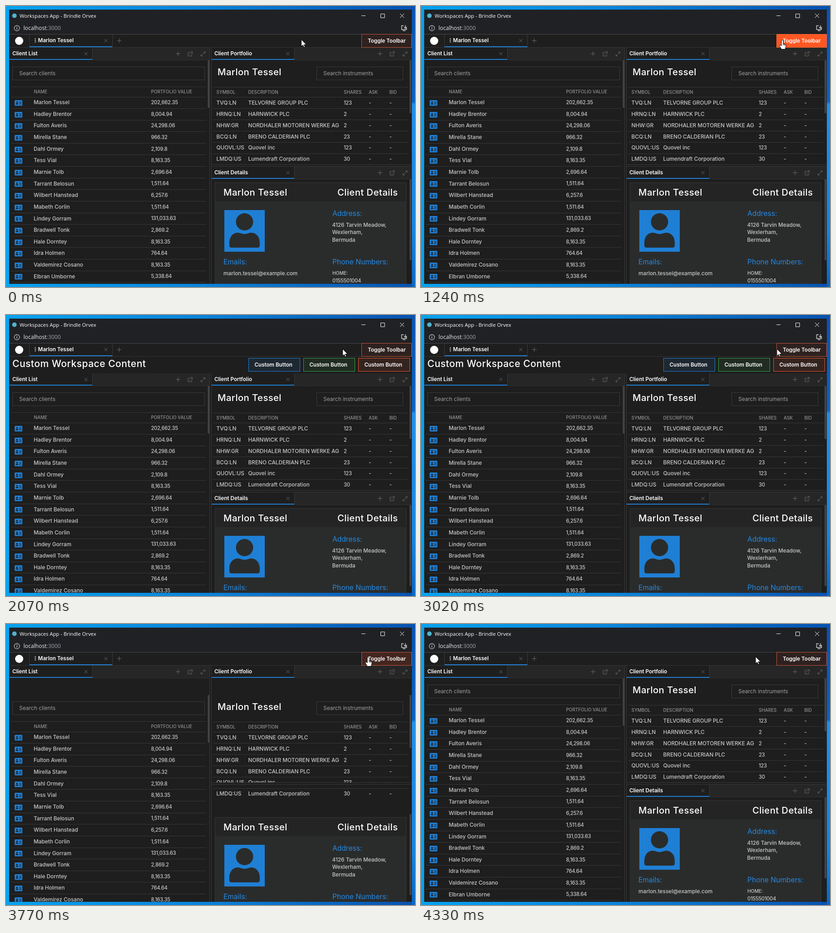
An HTML page for the animation above (5.46 s loop, 901 px wide and 621 px high).

```html
<!DOCTYPE html>
<html lang="en">
<head>
<meta charset="utf-8">
<title>Workspaces App</title>
<style>
html, body { margin: 0; width: 100%; height: 100%; overflow: hidden; background: #0a78d0; }
svg { display: block; width: 901px; height: 621px; }
text { font-family: Inter, "Open Sans", sans-serif; font-weight: 500; fill: #c9c9c9; white-space: pre; }
.chrome { font: 400 11.3px "Open Sans", sans-serif; fill: #fff; }
.url { font: 400 12.2px "Open Sans", sans-serif; fill: #f0f0f0; }
.tab { font-size: 11.6px; font-weight: 600; fill: #fff; }
.title { font-size: 20.3px; letter-spacing: .02em; fill: #fff; }
.head { font-size: 9.9px; fill: #929292; }
.row { font-size: 11.8px; }
.num { font-size: 11.2px; letter-spacing: -.025em; }
.hint { font-size: 12px; fill: #a0a0a0; font-weight: 400; }
.label { font-size: 15.6px; fill: #2489e3; font-weight: 400; }
.small { font-size: 10.2px; }
</style>
</head>
<body>
<svg id="stage" viewBox="0 0 901 621" xmlns="http://www.w3.org/2000/svg"></svg>
<script>
const LOOP = 5460, TOOLBAR = 37;
const BG = '#1e1e1e', BAR = '#262626', EDGE = '#3a3a3a', BLUE = '#1f7fd4', ICON = '#686868';

const clients = [
  ['Marlon Tessel', '202,662.35'], ['Hadley Brentor', '8,004.94'], ['Fulton Averis', '24,298.06'],
  ['Mirella Stane', '966.32'], ['Dahl Ormey', '2,109.8'], ['Tess Vial', '8,163.35'],
  ['Marnie Tolb', '2,696.64'], ['Tarrant Belosun', '1,511.64'], ['Wilbert Hanstead', '6,257.6'],
  ['Mabeth Corlin', '1,511.64'], ['Lindey Gorram', '131,033.63'], ['Bradwell Tonk', '2,869.2'],
  ['Hale Dorntey', '8,163.35'], ['Idra Holmen', '764.64'], ['Valdemirez Cosano', '8,163.35'],
  ['Elbran Umborne', '5,338.64']
];
const holdings = [
  ['TVQ:LN', 'TELVORNE GROUP PLC', 123], ['HRNQ:LN', 'HARNWICK PLC', 2],
  ['NHW:GR', 'NORDHALER MOTOREN WERKE AG', 2], ['BCQ:LN', 'BRENO CALDERIAN PLC', 23],
  ['QUOVL:US', 'Quovel inc', 123], ['LMDQ:US', 'Lumendraft Corporation', 30]
];
const owner = clients[0][0];

const text = (x, y, s, cls) => `<text x="${x}" y="${y}" class="${cls}">${s}</text>`;
const rect = (x, y, w, h, fill, extra = '') =>
  `<rect x="${x}" y="${y}" width="${w}" height="${h}" fill="${fill}" ${extra}/>`;
const path = (d, stroke = EDGE, extra = '') => `<path d="${d}" fill="none" stroke="${stroke}" ${extra}/>`;
const hline = (x1, x2, y, c = '#373737') => path(`M${x1} ${Math.floor(y) + .5}H${x2}`, c);
const cross = (x, y, r = 3.5) => path(`M${x - r} ${y - r}l${2 * r} ${2 * r}m0 ${-2 * r}l${-2 * r} ${2 * r}`, ICON);
const plus = (x, y) => path(`M${x - 5} ${y}h10m-5 -5v10`, ICON);
const clip = (id, x, y, w, h) => `<clipPath id="${id}">${rect(x, y, w, h, '#fff')}</clipPath>`;

function tabStrip(x, y, name) {
  const right = x + 371, mid = y + 13.5;
  return rect(x, y, 440, 27, BAR) + rect(x, y, 182, 27, BG) + path(`M${x + 182.5} ${y}v27`) +
    hline(x + 183, x + 440, y + 27, '#303030') + rect(x, y + 25, 182, 2, BLUE) +
    text(x + 6, y + 17, name, 'tab') + cross(x + 168, mid) + plus(right, mid) +
    path(`M${right + 26} ${mid - 3}h-4v8h8v-4m-5 1l6 -6m-4 -.5h4.5v4.5`, ICON) +
    path(`M${right + 51} ${mid + 4.5}l8 -8m-3 -.5h3.5v3.5m-9 2v3.5h3.5`, ICON);
}

const search = (x, w, s) => rect(x, 134.5, w, 29, BG, `stroke="${EDGE}"`) + text(x + 14.5, 152.8, s, 'hint');
const scrollbar = (x, y, h) => rect(x, y, 4, h, '#444', 'rx="1"');

function clientView() {
  const rows = clients.map(([name, value], i) => {
    const y = 213 + i * 25.63, top = Math.round(y - 5);
    return rect(19, top, 17, 12.5, BLUE, 'rx="1.5"') +
      `<circle cx="24.3" cy="${top + 4.5}" r="1.8" fill="${BG}"/>` +
      rect(21.5, top + 7, 5.6, 2.5, BG, 'rx="1"') +
      path(`M29 ${top + 4}h5m-5 2.5h5m-5 2.5h5`, BG) +
      text(61, y + 4.2, name, 'row') + text(319.5, y + 4, value, 'num') + hline(11, 441, y + 13.4);
  }).join('');
  return rect(8, 120, 440, 494, BG) + search(14.5, 423, 'Search clients') + hline(11, 441, 178) +
    text(61.5, 193.2, 'NAME', 'head') + text(319.5, 193.2, 'PORTFOLIO VALUE', 'head') +
    hline(11, 441, 201) + rows + scrollbar(444.5, 120, 105);
}

function portfolioView() {
  const heads = [['SYMBOL', 463.5], ['DESCRIPTION', 533.5], ['SHARES', 744], ['ASK', 799], ['BID', 844.5]];
  const rows = holdings.map(([symbol, name, shares], i) => {
    const y = 218 + i * 24.85;
    return text(463.5, y, symbol, 'row') + text(533.5, y, name, 'row') + text(744, y, shares, 'num') +
      text(799, y, '-', 'row') + text(844.5, y, '-', 'row') + hline(456, 886, y + 8.6);
  }).join('');
  return rect(453, 120, 440, 230, BG) + text(466, 153, owner, 'title') +
    search(684.5, 190, 'Search instruments') + hline(456, 886, 179) +
    heads.map(([s, x]) => text(x, 194, s, 'head')).join('') + hline(456, 886, 201) + rows +
    scrollbar(889, 120, 117);
}

function detailsView() {
  return rect(453, 383, 440, 231, BG) + rect(460.5, 390.5, 421, 240, '#2a2c2c', 'stroke="#363636"') +
    rect(461, 391, 420, 41, '#242424') + text(479, 419, owner, 'title') + text(730, 419, 'Client Details', 'title') +
    rect(481, 451, 89, 92, BLUE) + `<circle cx="525.5" cy="477" r="19" fill="#2a2c2c"/>` +
    `<path d="M492 529V523C492 510 500 501 511 501C516 501 519 504 525.5 504S535 501 540 501C551 501 559 510 559 523V529Q559 534 554 534H497Q492 534 492 529Z" fill="#2a2c2c"/>` +
    text(719, 464, 'Address:', 'label') + text(718.5, 487.5, '4126 Tarvin Meadow,', 'row') +
    text(718.5, 504, 'Wexlerham,', 'row') + text(718.5, 521, 'Bermuda', 'row') +
    text(479, 571, 'Emails:', 'label') + text(479, 594.5, 'marlon.tessel@example.com', 'row') +
    text(719, 571, 'Phone Numbers:', 'label') + text(719, 594, 'HOME:', 'small') +
    text(719, 611, '0155501004', 'num') + scrollbar(889, 383, 179);
}

function customButton(x, color) {
  return rect(x, 95.5, 113, 29, color, `fill-opacity=".1" stroke="${color}"`) +
    text(x + 13, 114.2, 'Custom Button', 'tab');
}

const chrome = rect(7, 8, 887, 606, BG) + rect(7, 8, 887, 54, '#202124') +
  '<circle cx="18.5" cy="21.5" r="5" fill="#4fb4d0"/>' +
  text(30, 25.8, 'Workspaces App - Brindle Orvex', 'chrome') +
  path('M783 21.5h9M825.5 17.5h8.5v8.5h-8.5zM868 17l9 9m0 -9l-9 9', '#fff') +
  '<circle cx="24" cy="49" r="5.8" fill="none" stroke="#c8c8c8" stroke-width="1.2"/>' +
  path('M24 48v4.2M24 45.5v1.4', '#c8c8c8', 'stroke-width="1.4"') +
  text(38.5, 53.2, 'localhost<tspan fill="#9aa0a6">:3000</tspan>', 'url') +
  path('M876 43.5h-4.5v8.5h11v-3.5M874 54.5h6M880 42.5v7m-3 -3l3 3l3 -3', '#d0d0d0', 'stroke-width="1.4"') +
  hline(7, 894, 62, '#484848') + hline(8, 893, 91, '#343434') +
  '<circle cx="29" cy="77" r="9" fill="#fff"/>' +
  path('M51.5 63v28M234.5 63v28') + rect(52, 89, 182, 2, BLUE) +
  path('M64.5 71.5v9', '#ddd', 'stroke-width="2" stroke-dasharray="2 1.5"') +
  text(70.5, 80.2, owner, 'tab') + cross(220, 76.5) + plus(249.5, 76.5);

const stage = document.getElementById('stage');
stage.innerHTML = `<defs>
  <linearGradient id="sky"><stop stop-color="#08a2ee"/><stop offset=".45" stop-color="#0a86dc"/><stop offset="1" stop-color="#0852b0"/></linearGradient>
  <linearGradient id="side" x2="0" y2="1"><stop stop-color="#0852b0"/><stop offset=".34" stop-color="#0b63c2"/><stop offset=".35" stop-color="#2090ea"/><stop offset=".8" stop-color="#1685e0"/><stop offset="1" stop-color="#0a66c0"/></linearGradient>
  ${clip('window', 7, 8, 887, 606)}${clip('upper', 453, 120, 440, 230)}</defs>
  ${rect(0, 0, 901, 621, 'url(#sky)')}${rect(894, 0, 7, 621, 'url(#side)')}
  <g clip-path="url(#window)">${chrome}
    <g id="custom">${text(14, 115, 'Custom Workspace Content', 'title" style="font-size:21px;letter-spacing:.024em')}
      ${customButton(534.5, '#1f80d8')}${customButton(655.5, '#35a548')}${customButton(776.5, '#f0562c')}</g>
    <g id="tabs">${tabStrip(8, 92, 'Client List')}${tabStrip(453, 92, 'Client Portfolio')}${tabStrip(453, 355, 'Client Details')}</g>
    <g id="views">${clientView()}<g clip-path="url(#upper)">${portfolioView()}</g>${detailsView()}</g>
    <g id="splitters">${rect(448, 92, 5, 530, BG)}${path('M448.5 92V622M452.5 92V622')}
      ${rect(453, 350, 440, 5, BG)}${path('M453 350.5H893M453 354.5H893')}</g>
    <rect id="toggle" x="783.5" y="62.5" width="110" height="29"/>${text(797, 81, 'Toggle Toolbar', 'tab')}
  </g>
  <g id="pointer" fill="#fff" stroke="#000" stroke-linejoin="round">
    <path id="arrow" d="M0 0V15.5L3.6 12.2L6 17.5L8.3 16.5L6 11.3H11Z"/>
    <g id="hand"><path d="M-2 1.5C-2 -1.5 2 -1.5 2 1.5V7.5L6 8.5C8 9 8.4 10 8.2 12L7.4 16L6 19.5H-2L-6 12.5C-6.8 10.5 -5 9.5 -3.8 10.5L-2 12Z"/>
      <path d="M2 7v4M4.2 8.5v3M6.2 9v3" fill="none" stroke-width=".8"/></g>
  </g>`;

const part = id => document.getElementById(id);
const [custom, tabs, views, splitters, toggle, pointer, arrow, hand] =
  ['custom', 'tabs', 'views', 'splitters', 'toggle', 'pointer', 'arrow', 'hand'].map(part);

// Keys: time, then values
const cursorKeys = [
  [0, 650.5, 74], [200, 650.5, 74], [760, 787, 78], [970, 796, 76], [1380, 796, 76], [1590, 781.5, 76],
  [1870, 748, 75], [2010, 741.5, 75], [2600, 741.5, 75], [3020, 784, 75], [3160, 789, 73],
  [3500, 789, 73], [3570, 798, 74], [3840, 798, 74], [4190, 741, 72], [4330, 737, 72], [LOOP, 737, 72]
];
const hoverKeys = [
  [0, 0], [800, 0], [1100, 1], [1309, 1], [1310, .1], [1520, 1], [1590, 1], [1870, 0],
  [3020, 0], [3370, 1], [3769, 1], [3770, .1], [3950, .8], [4190, 0], [LOOP, 0]
];

function sample(keys, t) {
  const i = keys.findIndex(k => k[0] > t), a = keys[i - 1], b = keys[i];
  const p = (t - a[0]) / (b[0] - a[0]);
  return a.slice(1).map((v, j) => v + (b[j + 1] - v) * p);
}

function tick(t) {
  const start = [0, 270, 1310, 2670, 3570, 3770].filter(s => s <= t).pop();
  return start + Math.floor((t - start) / 70) * 70;
}

const mix = (a, b, p) => `rgb(${a.map((v, i) => Math.round(v + (b[i] - v) * p))})`;
const shift = (el, y) => el.setAttribute('transform', `translate(0 ${y})`);

function draw(t) {
  const open = t >= 1310 && t < 3770, viewsOpen = t >= 1310 && t < 3840;
  custom.style.display = open ? '' : 'none';
  shift(tabs, open ? TOOLBAR : 0);
  shift(splitters, open ? TOOLBAR : 0);
  shift(views, viewsOpen ? TOOLBAR : 0);

  const time = tick(t), [hover] = sample(hoverKeys, time), [x, y] = sample(cursorKeys, time);
  toggle.setAttribute('fill', mix([46, 33, 31], [255, 87, 34], hover));
  toggle.setAttribute('stroke', mix([196, 86, 62], [255, 105, 60], hover));
  pointer.setAttribute('transform', `translate(${x} ${y})`);
  const pointing = x > 788;
  arrow.style.display = pointing ? 'none' : '';
  hand.style.display = pointing ? '' : 'none';
}

const begin = performance.now();
function loop() {
  draw((performance.now() - begin) % LOOP);
  requestAnimationFrame(loop);
}
loop();
</script>
</body>
</html>
```
